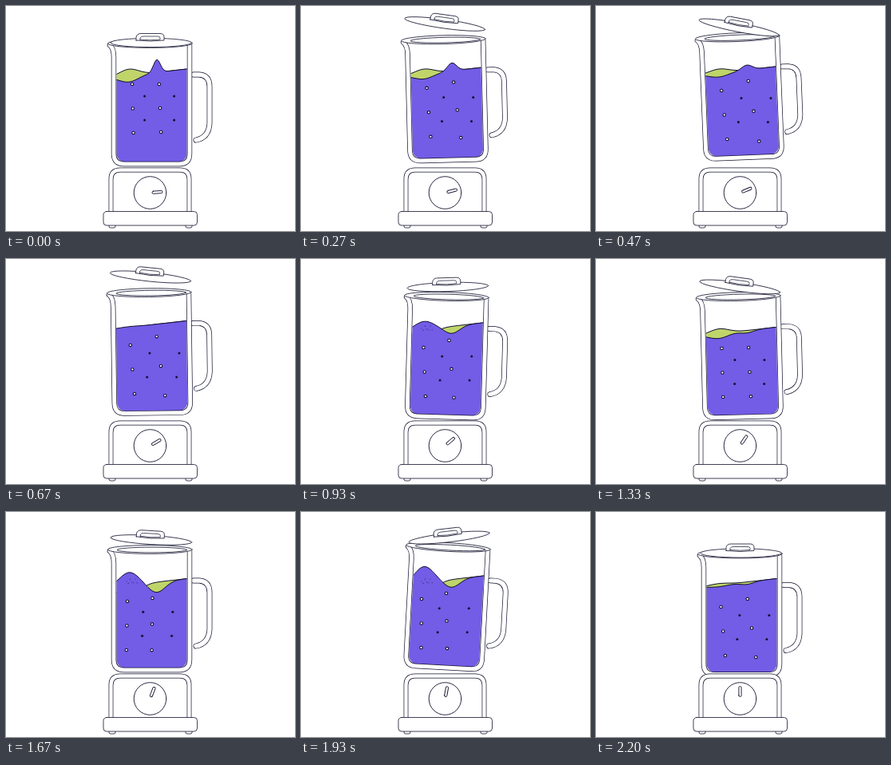
Write an HTML page with a canvas that moves like this. It is 362 by 282 pixels and loops after 2.34 s.

```html
<!DOCTYPE html>
<html lang="en">
<head>
<meta charset="utf-8">
<title>Blender</title>
<style>
  html, body { margin: 0; width: 100%; height: 100%; overflow: hidden; background: #fff; }
  canvas { display: block; width: 362px; height: 282px; }
</style>
</head>
<body>
<canvas id="stage" width="362" height="282"></canvas>
<script>
const ctx = document.getElementById('stage').getContext('2d');
const LOOP = 2340, FPS = 15, LAST = 33;
const INK = '#12122e', WHITE = '#fff', PURPLE = '#735ce6', GREEN = '#bfd56a';
const RAD = Math.PI / 180;

// The shake runs through seven beats; everything else follows from these values.
const BEATS = [0, 7, 14, 20, 25, 29, 33];
const TILT = [0, -2.3, 1.6, -1.4, 0, 3.1, 0];
const LIFT = [0, -8, 0, 0, 0, -3, 5.5];
const HUMP = [8, 5, -10, 6, -16, -20, 2];
const DIP = [-16, -6, 9, 3, 13, 10, 3];
const DROP = [0, 8, 13, 14, 14, 11, 21];
const SPREAD = [0, 12, 9, 1, 4, 7, 10];

function poseAt(step) {
  let i = 0;
  while (i < BEATS.length - 2 && step >= BEATS[i + 1]) i++;
  const k = (step - BEATS[i]) / (BEATS[i + 1] - BEATS[i]);
  const ease = k * k * (3 - 2 * k);
  const mix = v => v[i] + (v[i + 1] - v[i]) * ease;
  return {
    tilt: mix(TILT), lift: mix(LIFT), hump: mix(HUMP),
    dip: mix(DIP), drop: mix(DROP), spread: mix(SPREAD),
    open: Math.min(1, 3 * Math.sin(Math.PI * step / LAST)),
    hop: 8 * Math.sin(Math.PI * k) ** 2,
    turn: -4 - 86 * step / LAST
  };
}

function outline(path, width = .8) {
  ctx.strokeStyle = INK;
  ctx.lineWidth = width;
  ctx.stroke(path);
}

function shape(path, fill, width) {
  ctx.fillStyle = fill;
  ctx.fill(path);
  outline(path, width);
}

function tube(path, width) {
  ctx.lineCap = ctx.lineJoin = 'round';
  outline(path, width + 1.4);
  ctx.strokeStyle = WHITE;
  ctx.lineWidth = width;
  ctx.stroke(path);
}

function oval(x, y, rx, ry = rx) {
  const p = new Path2D();
  p.ellipse(x, y, rx, ry, 0, 0, 7);
  return p;
}

function box(x, y, w, h, r) {
  const p = new Path2D();
  p.roundRect(x, y, w, h, r);
  return p;
}

function place(x, y, angle, paint) {
  ctx.save();
  ctx.translate(x, y);
  ctx.rotate(angle * RAD);
  paint();
  ctx.restore();
}

const handle = new Path2D('M235 86H242Q255 87 255 101V147Q254 165 238 168');
const walls = new Path2D('M130 49Q135 53 135 64V185Q135 198 148 198H217Q230 198 230 185V49');
const cavity = box(138.5, 40, 88, 155.5, 11);
const housing = new Path2D('M131.5 259V217Q131.5 205.5 143 205.5H218Q229.5 205.5 229.5 217V259');
const lidKnob = new Path2D('M-19 -3V-7Q-18 -11.5 -13 -11.5H11Q16 -11.5 16 -7V-3Q-1 -1 -19 -3Z');
const lidKnobInner = new Path2D('M-14 -4V-6Q-13 -8 -10 -8H8Q11 -8 11 -6V-4Q-1 -2.5 -14 -4Z');

function moveJug({ tilt, lift }) {
  ctx.translate(182, 125 + lift);
  ctx.rotate(tilt * RAD);
  ctx.translate(-182, -125);
}

const bell = (x, centre, width) => Math.exp(-(((x - centre) / width) ** 2));

function wave({ drop, spread }, hump, dip) {
  const level = 84 + .5 * drop - .6 * spread;
  const p = new Path2D();
  for (let x = 120; x <= 245; x++) {
    const slope = -5 * (x - 182) / 44;
    p.lineTo(x, level + slope + hump * bell(x, 154, 17) + dip * bell(x, 189, 11 + .3 * dip));
  }
  return p;
}

function pour(top, fill) {
  const body = new Path2D(top);
  body.lineTo(245, 215);
  body.lineTo(120, 215);
  ctx.fillStyle = fill;
  ctx.fill(body);
  outline(top, 1);
}

function drawSeeds({ hump, drop, spread }) {
  const dot = (x, y) => shape(oval(x, y, 1.7), WHITE, 1.1);
  for (let row = 0; row < 3; row++) {
    dot(156 + .25 * hump + row * (.25 * spread + .1 * hump), 98 + drop + row * 30.5);
    dot(189 + .35 * hump + row * (.5 * spread + .15 * hump),
      98 + drop - spread + row * (30 + .65 * spread));
  }
  ctx.fillStyle = INK;
  for (let i = 0; i < 4; i++) {
    const row = i >> 1;
    ctx.fill(oval(172 + .75 * spread + .2 * hump - .3 * spread * row + 37 * (i % 2),
      113 + drop - .45 * spread + 30 * row, 1.5));
  }
  ctx.globalAlpha = Math.max(0, Math.min(.7, -hump / 10));
  for (let i = 0; i < 7; i++) ctx.fill(oval(151 + 2.2 * i, 87 + 3 * Math.sin(i * 2.2), .6));
  ctx.globalAlpha = 1;
}

function drawLiquid(pose) {
  ctx.save();
  const still = ctx.getTransform();
  moveJug(pose);
  ctx.clip(cavity);
  ctx.setTransform(still);
  pour(wave(pose, -pose.hump, 0), GREEN);
  pour(wave(pose, pose.hump, pose.dip), PURPLE);
  drawSeeds(pose);
  ctx.restore();
}

function drawJug(pose) {
  ctx.save();
  moveJug(pose);
  tube(handle, 5.4);
  ctx.fillStyle = WHITE;
  ctx.fill(walls);
  ctx.restore();

  drawLiquid(pose);

  ctx.save();
  moveJug(pose);
  tube(walls, 5);
  shape(oval(180.5, 47, 53, 5.4), WHITE);
  shape(oval(183, 47.5, 44, 3.4), WHITE);
  ctx.restore();
}

function drawLid({ tilt, lift, open, hop }) {
  place(182 + 1.2 * tilt, 46 + lift - (11 + hop) * open, (3.4 - 3.2 * tilt) * open, () => {
    shape(oval(0, 0, 51, 5.6), WHITE);
    shape(lidKnob, WHITE);
    outline(lidKnobInner, .7);
  });
}

function drawBase({ turn }) {
  ctx.fillStyle = WHITE;
  ctx.fill(housing);
  tube(housing, 4.4);
  for (const x of [129, 225]) shape(box(x, 272, 8, 6, 2), WHITE);
  shape(box(122, 257.5, 117.5, 17.5, 4), WHITE);
  shape(oval(180.5, 234, 20.3), WHITE, .9);
  place(180.5, 234, turn, () => shape(box(2.5, -1.6, 13, 3.2, 1.6), WHITE, .9));
}

function draw(now) {
  const step = Math.min(LAST, Math.floor((now % LOOP + 4) * FPS / 1000));
  const pose = poseAt(step);
  ctx.fillStyle = WHITE;
  ctx.fillRect(0, 0, 362, 282);
  drawJug(pose);
  drawLid(pose);
  drawBase(pose);
}

let start;
function tick(now) {
  start ??= now;
  draw(now - start);
  requestAnimationFrame(tick);
}
draw(0);
requestAnimationFrame(tick);
</script>
</body>
</html>
```
